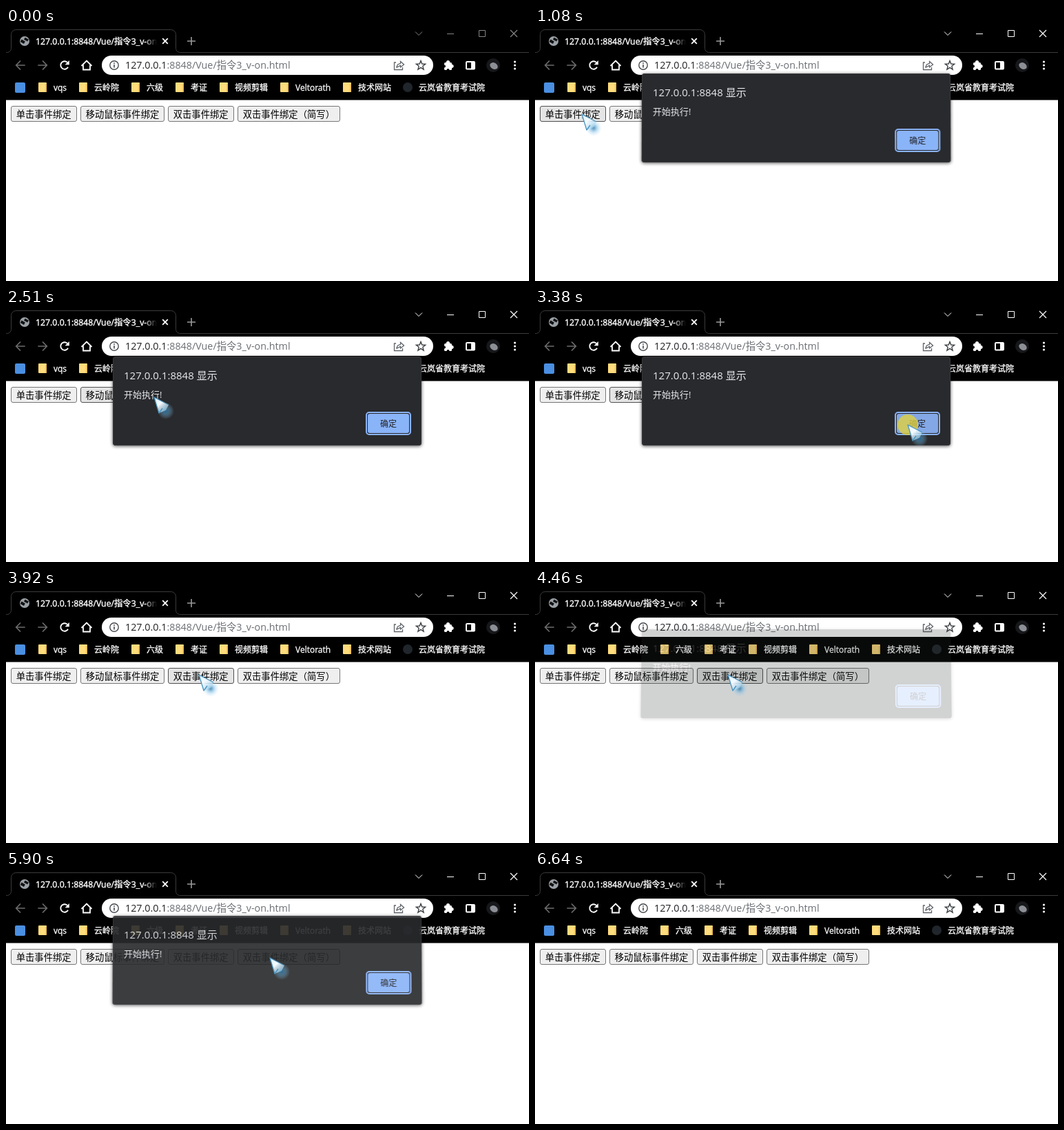
An HTML page with a canvas for the animation above (7.04 s loop, 759 px wide and 367 px high).

```html
<!DOCTYPE html>
<html lang="zh-CN">
<head>
<meta charset="utf-8">
<title>v-on</title>
<style>
html, body { margin: 0; width: 100%; height: 100%; overflow: hidden; background: #fff; }
canvas { display: block; }
</style>
</head>
<body>
<canvas id="stage" width="759" height="367"></canvas>
<script>
const LOOP = 7040, OPEN = 250, CLOSE = 200, HOLD = 130;
const FONT = '"Open Sans", "Noto Sans CJK SC", "Noto Sans CJK", sans-serif';
const CJK = '"Noto Sans CJK SC", "Noto Sans CJK", sans-serif';
const stage = document.getElementById('stage').getContext('2d');

// One round per button: reach it, click it, dialog opens, press OK.
// bend curves the way there; clicks is how often the button is clicked.
const START = { t: 70, go: 250, x: 103, y: 192 };
const OK = { x: 541, y: 168 };
const ROUNDS = [
  { label: '单击事件绑定', reach: 470, x: 68, y: 125, bend: 1, clicks: 1, click: 750, open: 972, press: 1700 },
  { label: '移动鼠标事件绑定', reach: 2220, x: 215, y: 128, bend: 1.8, clicks: 0, click: 0, open: 2270, press: 3360 },
  { label: '双击事件绑定', reach: 3900, x: 280, y: 123, bend: 1, clicks: 2, click: 4180, open: 4440, press: 4800 },
  { label: '双击事件绑定（简写）', reach: 5410, x: 383, y: 126, bend: .6, clicks: 2, click: 5560, open: 5810, press: 6170 }
];
let left = 7;
for (const r of ROUNDS) {
  const w = r.label.length * 40 / 3 + 16;
  r.left = Math.round(left);
  r.width = Math.floor(w);
  r.close = r.press + HOLD;
  left += w + 4.9;
}
const FOLDERS = ['vqs', '云岭院', '六级', '考证', '视频剪辑', 'Veltorath', '技术网站'];

const clamp = v => Math.max(0, Math.min(1, v));
const span = (t, a, b) => clamp((t - a) / (b - a));
const mix = (a, b, p) => a + (b - a) * p;
const easeOut = p => 1 - (1 - p) ** 3;
const easeBoth = p => p * p * (3 - 2 * p);

// heavy adds a hairline around the glyphs
function text(c, s, x, y, size, color, font = FONT, heavy = 0) {
  c.font = `${size}px ${font}`;
  c.fillStyle = c.strokeStyle = color;
  c.fillText(s, x, y);
  if (!heavy) return;
  c.lineWidth = heavy;
  c.strokeText(s, x, y);
}
function box(c, x, y, w, h, r, fill, stroke, width = 1) {
  c.beginPath();
  c.roundRect(x, y, w, h, r);
  if (fill) { c.fillStyle = fill; c.fill(); }
  if (stroke) { c.strokeStyle = stroke; c.lineWidth = width; c.stroke(); }
}
function line(c, color, width, ...runs) {
  c.strokeStyle = color;
  c.lineWidth = width;
  c.beginPath();
  for (const p of runs)
    for (let i = 0; i < p.length; i += 2) c[i ? 'lineTo' : 'moveTo'](p[i], p[i + 1]);
  c.stroke();
}
function cross(c, x, y, r, color, width) {
  line(c, color, width, [x - r, y - r, x + r, y + r], [x + r, y - r, x - r, y + r]);
}
function disc(c, x, y, r, fill) {
  c.beginPath();
  c.arc(x, y, r, 0, 7);
  c.fillStyle = fill;
  c.fill();
}
function ring(c, x, y, r, color, width, from = 0, to = 7) {
  c.beginPath();
  c.arc(x, y, r, from, to);
  c.strokeStyle = color;
  c.lineWidth = width;
  c.stroke();
}

function drawTabs(c, active) {
  c.fillStyle = '#000';
  c.fillRect(0, 0, 759, 104.5);
  c.beginPath();
  c.moveTo(0, 35.5);
  c.arcTo(7.5, 35.5, 7.5, 28, 6);
  c.arcTo(7.5, 2.5, 20, 2.5, 7);
  c.arcTo(246.5, 2.5, 246.5, 20, 7);
  c.arcTo(246.5, 35.5, 256, 35.5, 6);
  c.lineTo(759, 35.5);
  c.strokeStyle = '#3b3b3b';
  c.lineWidth = 1;
  c.stroke();

  // globe
  disc(c, 27, 19, 7, '#9aa0a6');
  c.save();
  c.translate(27, 19);
  c.rotate(.5);
  c.fillStyle = '#111';
  c.fillRect(-5, 0, 6, 4);
  c.fillRect(-2, -5, 6, 3.5);
  c.restore();

  text(c, '127.0.0.1:8848/Vue/指令3_v-on', 43, 23.5, 12.3, '#fff', FONT, .4);
  const fade = c.createLinearGradient(200, 0, 219, 0);
  fade.addColorStop(0, 'rgba(0,0,0,0)');
  fade.addColorStop(1, '#000');
  c.fillStyle = fade;
  c.fillRect(200, 8, 45, 22);
  cross(c, 231, 19, 3.8, '#fff', 1.8);
  line(c, '#9a9a9a', 1.6, [263, 19, 275, 19], [269, 13, 269, 25]);

  const tone = active ? '#fff' : '#858585';
  line(c, tone, 1, [594, 5.5, 599, 10.5, 604, 5.5], [640, 8.5, 650, 8.5]);
  cross(c, 737, 8, 5, tone, 1.2);
  box(c, 686.5, 3.5, 9, 9, 0, null, tone);
}

function drawToolbar(c) {
  for (const [x, dir] of [[21, 1], [53, -1]]) {
    const tip = x - 6.3 * dir;
    line(c, '#6c6c6c', 1.7, [tip, 54, tip + 13 * dir, 54], [x, 47.5, tip, 54, x, 60.5]);
  }
  ring(c, 85, 54, 5.7, '#fff', 1.9, .5, 5.5);
  c.fillStyle = '#fff';
  c.beginPath();
  c.moveTo(91.8, 47); c.lineTo(91.8, 53.2); c.lineTo(85.6, 53.2);
  c.fill();
  line(c, '#fff', 1.8, [109.5, 55, 117, 47.5, 124.5, 55], [112, 53.5, 112, 60.5, 122, 60.5, 122, 53.5]);

  box(c, 139, 40, 481, 28, 14, '#fff');
  ring(c, 157, 54, 6.2, '#45494d', 1.4);
  c.fillStyle = '#45494d';
  c.fillRect(156.2, 53, 1.6, 4.5);
  c.fillRect(156.2, 50.2, 1.6, 1.7);
  const host = '127.0.0.1';
  text(c, host, 173, 59, 14.3, '#202124');
  text(c, ':8848/Vue/指令3_v-on.html', 173 + c.measureText(host).width, 59, 14.3, '#6a6e73');

  // share and star
  line(c, '#5f6368', 1.3, [566, 50, 563.5, 50, 563.5, 60.5, 575.5, 60.5, 575.5, 57],
    [566.5, 57.5, 568.5, 53, 572.5, 51.4, 572.5, 48.5, 577.5, 53, 572.5, 57, 572.5, 54.4, 566.5, 57.5]);
  c.beginPath();
  for (let i = 0; i < 10; i++) {
    const a = (i / 5 - .5) * Math.PI, r = i % 2 ? 3 : 7;
    c.lineTo(602 + r * Math.cos(a), 54.4 + r * Math.sin(a));
  }
  c.closePath();
  c.strokeStyle = '#3c4043';
  c.lineWidth = 1.4;
  c.stroke();

  // extension piece, side panel, avatar, menu
  box(c, 636, 50, 11, 11, 1.5, '#fff');
  disc(c, 641.5, 49.6, 2.6, '#fff');
  disc(c, 647, 55.3, 2.6, '#fff');
  disc(c, 636, 55.5, 2, '#000');
  disc(c, 641.5, 61, 2, '#000');
  box(c, 668, 49, 12, 10.5, 1, null, '#fff', 2);
  c.fillStyle = '#fff';
  c.fillRect(675, 49, 5, 10);
  disc(c, 707, 54, 10, '#17181b');
  c.beginPath();
  c.ellipse(708, 55, 6, 4.5, .5, 0, 7);
  c.fillStyle = '#8d8f96';
  c.fill();
  for (const y of [49, 54, 59]) disc(c, 738.5, y, 1.6, '#fff');
}

function drawBookmarks(c) {
  box(c, 13, 79, 15, 15, 2, '#4a8fe2');
  let x = 47;
  for (const label of FOLDERS) {
    box(c, x, 79, 12, 14, 1, '#ffdc7c');
    c.fillStyle = '#f0c05a';
    c.fillRect(x + 10, 81, 2, 12);
    text(c, label, x + 22, 91, 12, '#fff', FONT, .3);
    x += Math.round(c.measureText(label).width) + 40;
  }
  disc(c, 583, 86, 7, '#20262b');
  text(c, '云岚省教育考试院', 599, 91, 12, '#fff', FONT, .3);
}

function drawButton(c, r, t) {
  const hot = t >= r.reach - 30 && t < r.close;
  box(c, r.left + .5, 113.5, r.width - 1, 22, 2.5, hot ? '#e5e5e5' : '#efefef', hot ? '#4f4f4f' : '#767676');
  text(c, r.label, r.left + 7.7, 130, 40 / 3, '#000', CJK);
}

// The dialog sits at 5,5 in its own layer to leave room for the shadow.
function makeDialog(fill, focus) {
  const el = document.createElement('canvas');
  el.width = 458;
  el.height = 140;
  const c = el.getContext('2d');
  c.shadowColor = 'rgba(0,0,0,.7)';
  c.shadowBlur = 5;
  c.shadowOffsetY = 1;
  box(c, 5, 5, 448, 129, 4, '#292a2d');
  c.shadowColor = 'transparent';
  box(c, 5.5, 5.5, 447, 128, 3.5, null, '#38393c');
  text(c, '127.0.0.1:8848 显示', 21, 38, 15, '#e8eaed');
  text(c, '开始执行!', 21, 65, 13, '#e8eaed');
  if (focus) box(c, 373, 86, 64, 32, 4, null, '#8ab4f8', 2);
  const rim = focus ? 0 : 1;
  box(c, 375 - rim, 88 - rim, 60 + 2 * rim, 28 + 2 * rim, 3, fill);
  text(c, '确定', 393, 106.5, 12, '#202124');
  return el;
}
const idle = makeDialog('#8ab4f8', true);
const hover = makeDialog('#84a8e6', true);
const leaving = makeDialog('#8ab4f8', false);

function drawDialog(c, r, t) {
  if (t < r.open || t >= r.close + CLOSE) return;
  const out = span(t, r.close, r.close + CLOSE), p = span(t, r.open, r.open + OPEN);
  const lift = out ? 20 * out ** .85 : 16 * (1 - p) ** 3;
  const img = out ? leaving : t > r.press - 40 ? hover : idle;
  const top = Math.round(64 - lift);
  c.globalAlpha = out ? 1 - out : clamp(p * 2.5);
  for (let row = 0; row < 140; row++) {
    // the lower edge leans toward the viewer
    const grow = lift < .5 ? 0 : lift * .3 * row / 140;
    c.drawImage(img, 0, row, 458, 1, 150 - grow / 2, top + row, 458 + grow, 1);
  }
  c.globalAlpha = 1;
}

function pointer(t) {
  if (t < START.t) return null;
  let from = START, go = START.go;
  for (const r of ROUNDS) {
    const p = span(t, go, r.reach);
    if (p < 1) return [mix(from.x, r.x, easeOut(p)), mix(from.y, r.y, p ** r.bend)];
    if (t < r.close) {
      const q = easeBoth(span(t, mix(r.open, r.press, .4), r.press - 20));
      return [mix(r.x, OK.x, q), mix(r.y, OK.y, q)];
    }
    from = OK;
    go = r.close;
  }
  const p = span(t, go, 6640);
  return p < 1 ? [mix(OK.x, 578, p), mix(OK.y, 370, p)] : null;
}

function pressed(t) {
  return ROUNDS.some(r => {
    const since = t - r.click, n = Math.floor(since / 140);
    return t >= r.press && t < r.press + 120 || n >= 0 && n < r.clicks && since % 140 < 80;
  });
}

function drawPointer(c, x, y) {
  c.save();
  c.translate(x, y);
  const glow = c.createRadialGradient(17, 20, 1, 17, 20, 12);
  glow.addColorStop(0, 'rgba(50,125,175,.75)');
  glow.addColorStop(.5, 'rgba(110,185,230,.35)');
  glow.addColorStop(1, 'rgba(160,215,250,0)');
  c.fillStyle = glow;
  c.fillRect(4, 7, 26, 26);
  c.beginPath();
  c.moveTo(0, 0);
  c.lineTo(21, 11);
  c.lineTo(17, 19);
  c.lineTo(7, 23);
  c.closePath();
  const body = c.createLinearGradient(0, 0, 18, 22);
  body.addColorStop(0, '#d4efff');
  body.addColorStop(.45, '#f6fbff');
  body.addColorStop(1, 'rgba(150,205,235,.5)');
  c.fillStyle = body;
  c.fill();
  c.lineJoin = 'round';
  line(c, '#4b93bd', 1.3, [21, 11, 0, 0, 7, 23, 12, 16]);
  c.restore();
}

function draw(t) {
  const c = stage;
  c.fillStyle = '#fff';
  c.fillRect(0, 0, 759, 367);
  drawTabs(c, t >= ROUNDS[0].click);
  drawToolbar(c);
  drawBookmarks(c);
  for (const r of ROUNDS) drawButton(c, r, t);
  for (const r of ROUNDS) drawDialog(c, r, t);
  const at = pointer(t);
  if (!at) return;
  if (pressed(t)) disc(c, ...at, 15, 'rgba(224,207,64,.8)');
  drawPointer(c, ...at);
}

function tick() {
  draw(performance.now() % LOOP);
  requestAnimationFrame(tick);
}
tick();
</script>
</body>
</html>
```
